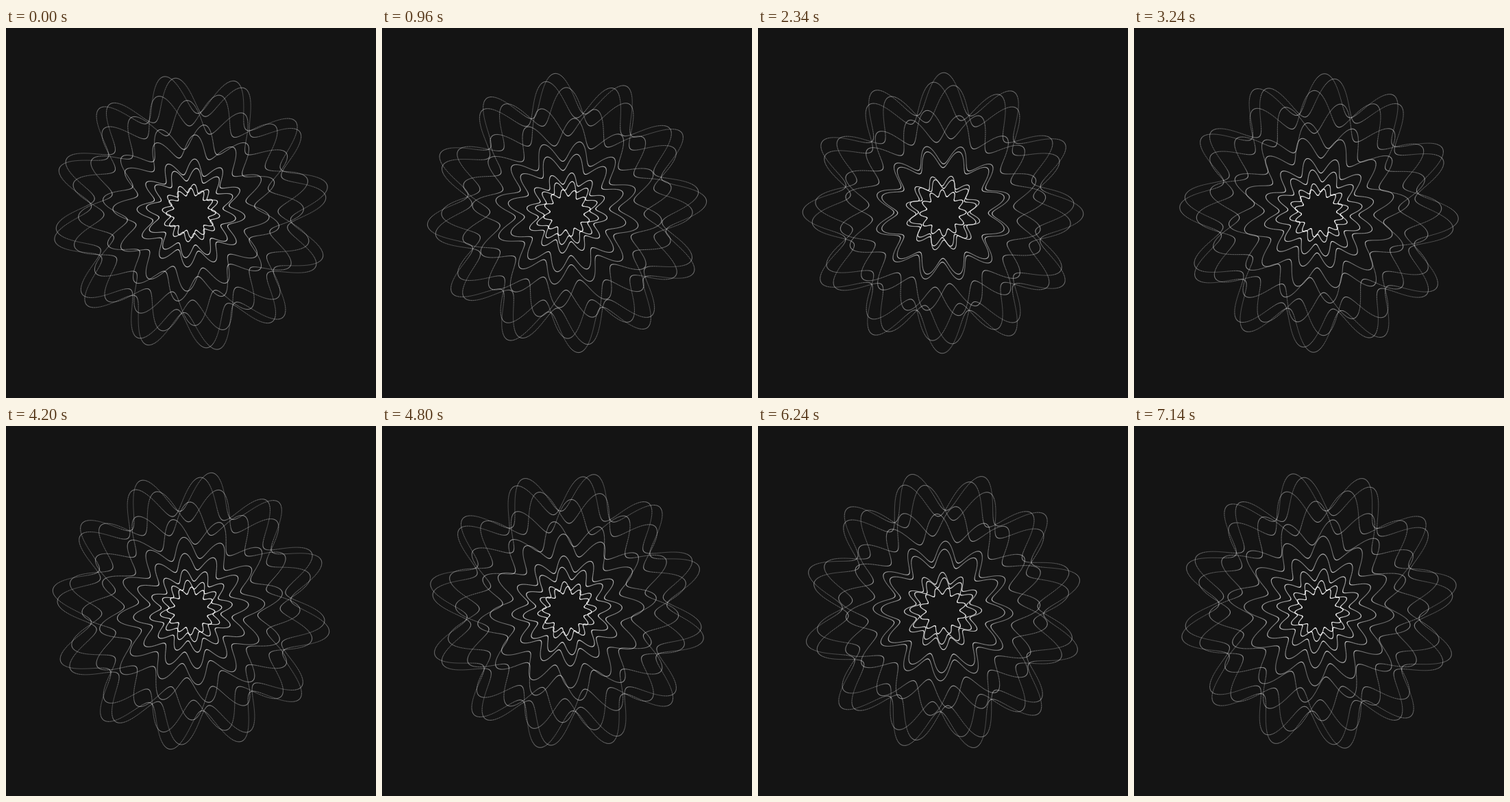
These frames come from a looping animation (540 px wide and 540 px high, 7.2 s). An HTML page with a canvas:

```html
<!DOCTYPE html>
<html lang="en">
<head>
<meta charset="utf-8">
<title>Rolling wave rings</title>
<style>
  html, body { margin: 0; width: 100%; height: 100%; overflow: hidden; background: #141414; }
  canvas { display: block; width: 540px; height: 540px; }
</style>
</head>
<body>
<canvas id="stage" width="540" height="540"></canvas>
<script>
const ctx = document.getElementById('stage').getContext('2d');
const { sin, cos, atan2, hypot, PI } = Math;
const SIZE = 540, MID = SIZE / 2;
const LOOP = 7200, STEP = 60, STEPS = LOOP / STEP;
const RINGS = 10, DOTS = 1200, PETALS = 12, DOT = 1.1;
const CORE = 102.5, TUBE = 73.5, LEAN = 22, WAVE = 0.164;
const rad = deg => deg * PI / 180;

// Every dot circles the core on a leaning loop; a is its place on that loop.
function drawRing(a, turn) {
  const out = CORE + TUBE * cos(a), side = LEAN * sin(a);
  const radius = hypot(out, side), shift = atan2(side, out);
  for (let i = 0; i < DOTS; i++) {
    const th = i / DOTS * 2 * PI;
    const r = radius * (1 + WAVE * cos(PETALS * (th - turn)));
    const x = MID + r * sin(th + shift), y = MID - r * cos(th + shift);
    ctx.fillRect(x - DOT / 2, y - DOT / 2, DOT, DOT);
  }
}

function draw(p) {
  ctx.fillStyle = '#141414';
  ctx.fillRect(0, 0, SIZE, SIZE);

  // One loop moves the petals by one petal and the rings by eleven ring gaps.
  const turn = rad(-9.75 + 360 / PETALS * p);
  const roll = -12.6 - 11 * 360 / RINGS * p;
  ctx.fillStyle = 'rgba(255, 255, 255, 0.38)';
  for (let j = 0; j < RINGS; j++) drawRing(rad(360 / RINGS * j + roll), turn);
}

const start = performance.now();
let shown = -1;

function tick() {
  const t = Math.max(0, performance.now() - start);
  const step = Math.floor(t / STEP) % STEPS;
  if (step !== shown) {
    shown = step;
    draw(step / STEPS);
  }
  requestAnimationFrame(tick);
}
tick();
</script>
</body>
</html>
```
